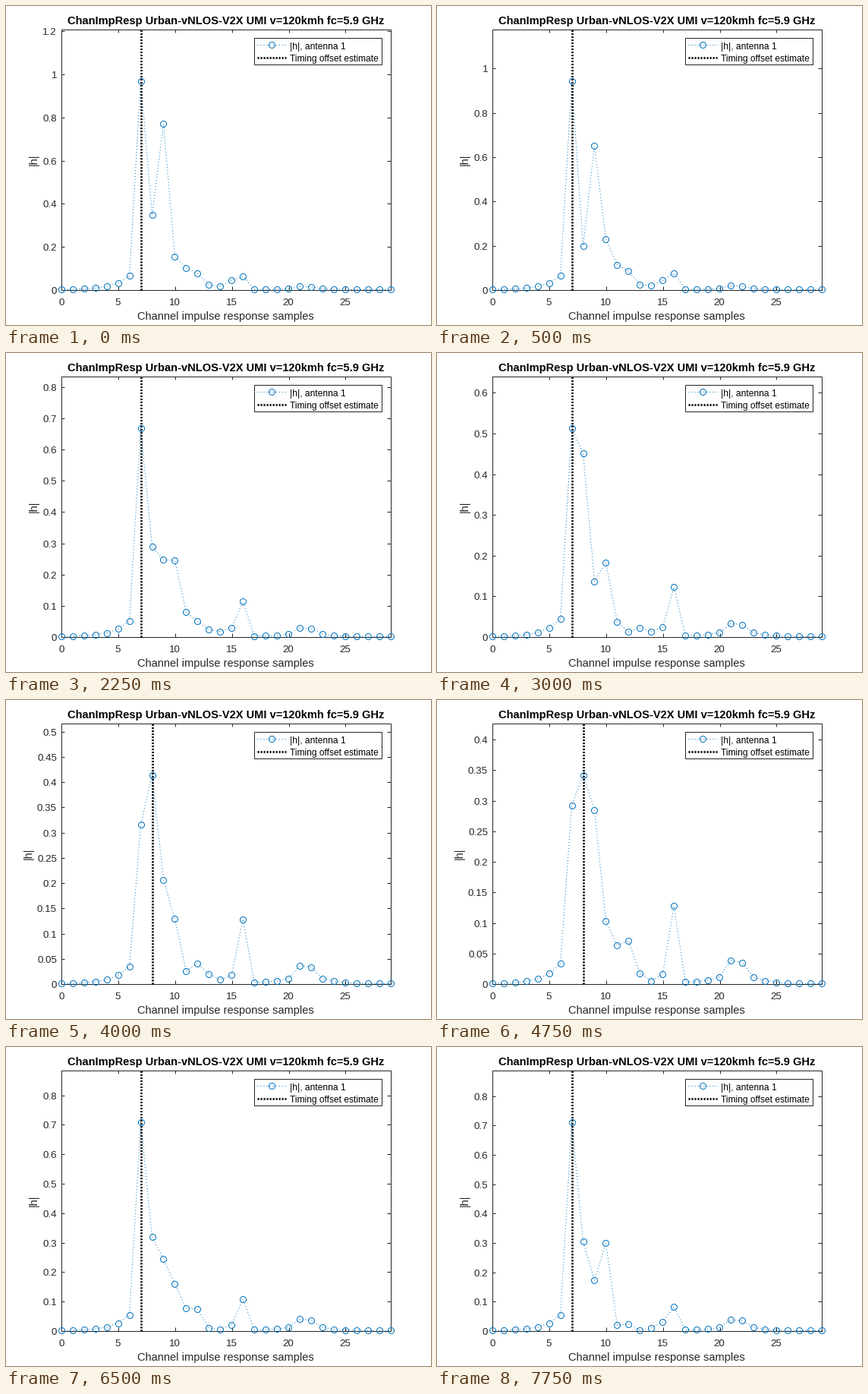
Animation of 560x420 px, one loop 8000 ms. Source, as a matplotlib script:

```python
import numpy as np
import matplotlib.pyplot as plt
from matplotlib.animation import FuncAnimation
from matplotlib.patches import Rectangle

W, H = 560, 420
FRAMES, INTERVAL = 32, 250
LEFT, RIGHT, TOP, BOTTOM = 72.8, 506.8, 30.5, 373.5
TAPS = 30
PT = 0.72  # points per pixel at 100 dpi
INK, BLUE = "#262626", "#0072BD"

plt.rcParams["font.family"] = "Liberation Sans"

# Key points of the four strong taps, 7 to 10
KEY_TIMES = np.array([0, 5, 12, 19, 23, 26, 31])
STRONG = np.array([
    [.967, .865, .512, .292, .578, .707, .710],
    [.347, .099, .450, .341, .272, .317, .304],
    [.769, .481, .136, .2845, .301, .2435, .171],
    [.155, .289, .182, .102, .097, .1585, .299],
])
SLOPES = np.gradient(STRONG, KEY_TIMES, axis=1, edge_order=2)

# Fixed shapes of the pulse's leading edge and of the late echo
LEAD = 0.49 ** np.arange(7)[::-1]
ECHO = np.concatenate([[.08, .09, .15, .29, 1, .92], .29 * .45 ** np.arange(7)])


def strong_taps(t):
    """Cubic Hermite interpolation between the key points."""
    i = min(np.searchsorted(KEY_TIMES, t, side="right") - 1, len(KEY_TIMES) - 2)
    span = KEY_TIMES[i + 1] - KEY_TIMES[i]
    u = (t - KEY_TIMES[i]) / span
    ease = u * u * (3 - 2 * u)
    value = (1 - ease) * STRONG[:, i] + ease * STRONG[:, i + 1]
    value += span * u * (1 - u) ** 2 * SLOPES[:, i]
    value -= span * u * u * (1 - u) * SLOPES[:, i + 1]
    return value


def fade(t, peak, centre, width, mean=0):
    """Magnitude of a slowly beating path."""
    return abs(mean + peak * np.cos((t - centre) / width))


def response(t):
    strong = strong_taps(t)
    weak = [
        fade(t, .100, 3.5, 6.3, mean=.015),
        fade(t, .085, 3, 6.3),
        fade(t, .023, 6, 17),
        fade(t, .008, 4, 6, mean=.011),
        fade(t, .016, -4, 7.5, mean=.031),
        fade(t, .128, 17, 15.8),
    ]
    lead = (.02 + .045 * strong[0]) * LEAD
    echo = fade(t, .039, 24, 20) * ECHO
    return np.concatenate([lead, strong, weak, echo])


def tick_step(top):
    return next(s for s in (.02, .05, .1, .2, .5) if top / s <= 10.85)


def x_px(n):
    return LEFT + n * (RIGHT - LEFT) / (TAPS - 1)


def label(x, y, s, size, **kw):
    kw = {"color": INK, "va": "baseline", **kw}
    return ax.text(x, y, s, fontsize=size * PT, **kw)


def segments(parts):
    """Join separate segments into one path with gaps."""
    xs, ys = [], []
    for x0, y0, x1, y1 in parts:
        xs += [x0, x1, np.nan]
        ys += [y0, y1, np.nan]
    return xs, ys


fig = plt.figure(figsize=(W / 100, H / 100), dpi=100, facecolor="white")
ax = fig.add_axes([0, 0, 1, 1])
ax.set(xlim=(0, W), ylim=(H, 0))
ax.axis("off")

thin = dict(color=INK, lw=PT, solid_capstyle="butt")
dotted = dict(color=BLUE, lw=PT, ls=(0, (1, 3)), dash_capstyle="butt", marker="o",
              ms=8 * PT, mfc="none", mec=BLUE, mew=PT)
heavy = dict(color="black", lw=2.67 * PT, ls=(0, (0.8, 0.7)), dash_capstyle="butt")

# Axes box and fixed ticks
left, right = np.floor([LEFT, RIGHT]) + .5
ax.add_patch(Rectangle((left, TOP), right - left, BOTTOM - TOP, fill=False,
                       ec=INK, lw=PT, zorder=1))
x_ticks = range(0, TAPS, 5)
ax.plot(*segments([(np.floor(x_px(n)) + .5, y, np.floor(x_px(n)) + .5, y + d)
                   for n in x_ticks for y, d in ((TOP, 4.5), (BOTTOM, -4.5))]),
        zorder=1, **thin)
for n in x_ticks:
    label(x_px(n), 394, str(n), 13.33, ha="center")

label(290, 24, "ChanImpResp Urban-vNLOS-V2X UMI v=120kmh fc=5.9 GHz", 14.67,
      ha="center", color="black", weight="bold")
label(289.5, 413, "Channel impulse response samples", 14.67, ha="center")
y_name = label(40.5, 202, "|h|", 14.67, ha="center", rotation=90,
               rotation_mode="anchor")

# Moving parts
y_ticks, = ax.plot([], [], zorder=1, **thin)
y_labels = [label(67, 0, "", 13.33, ha="right") for _ in range(12)]
curve, = ax.plot([], [], zorder=3, **dotted)
offset, = ax.plot([], [], zorder=4, **heavy)

# Legend
ax.add_patch(Rectangle((326.5, 41.5), 168, 35, fc="white", ec=INK, lw=PT, zorder=5))
ax.plot([331, 369], [51, 51], zorder=6, **{**dotted, "marker": ""})
ax.plot([350], [51], zorder=6, **dotted)
ax.plot([331, 369], [68, 68], zorder=6, **heavy)
label(373.5, 57, "|h|, antenna 1", 12, color="black", zorder=6)
label(373.5, 73, "Timing offset estimate", 12, color="black", zorder=6)


def update(i):
    h = response(i)
    top = 1.25 * h.max()
    step = tick_step(top)
    scale = (BOTTOM - TOP) / top

    curve.set_data(x_px(np.arange(TAPS)), BOTTOM - h * scale)
    peak = x_px(int(h.argmax()))
    offset.set_data([peak, peak], [BOTTOM, TOP])

    marks = []
    for k, text in enumerate(y_labels):
        value = k * step
        y = BOTTOM - value * scale
        shown = value <= top
        text.set_visible(shown)
        if shown:
            text.set_text(f"{value:g}")
            text.set_y(y + 5.5)
            row = np.floor(y) + .5
            marks += [(left, row, left + 4.5, row), (right, row, right - 4.5, row)]
    y_ticks.set_data(*segments(marks))
    y_name.set_x(33.5 if step < .1 else 40.5)
    return [curve, offset, y_ticks, y_name, *y_labels]


anim = FuncAnimation(fig, update, frames=FRAMES, interval=INTERVAL, repeat=True,
                     repeat_delay=0, blit=False)
plt.show()
```
